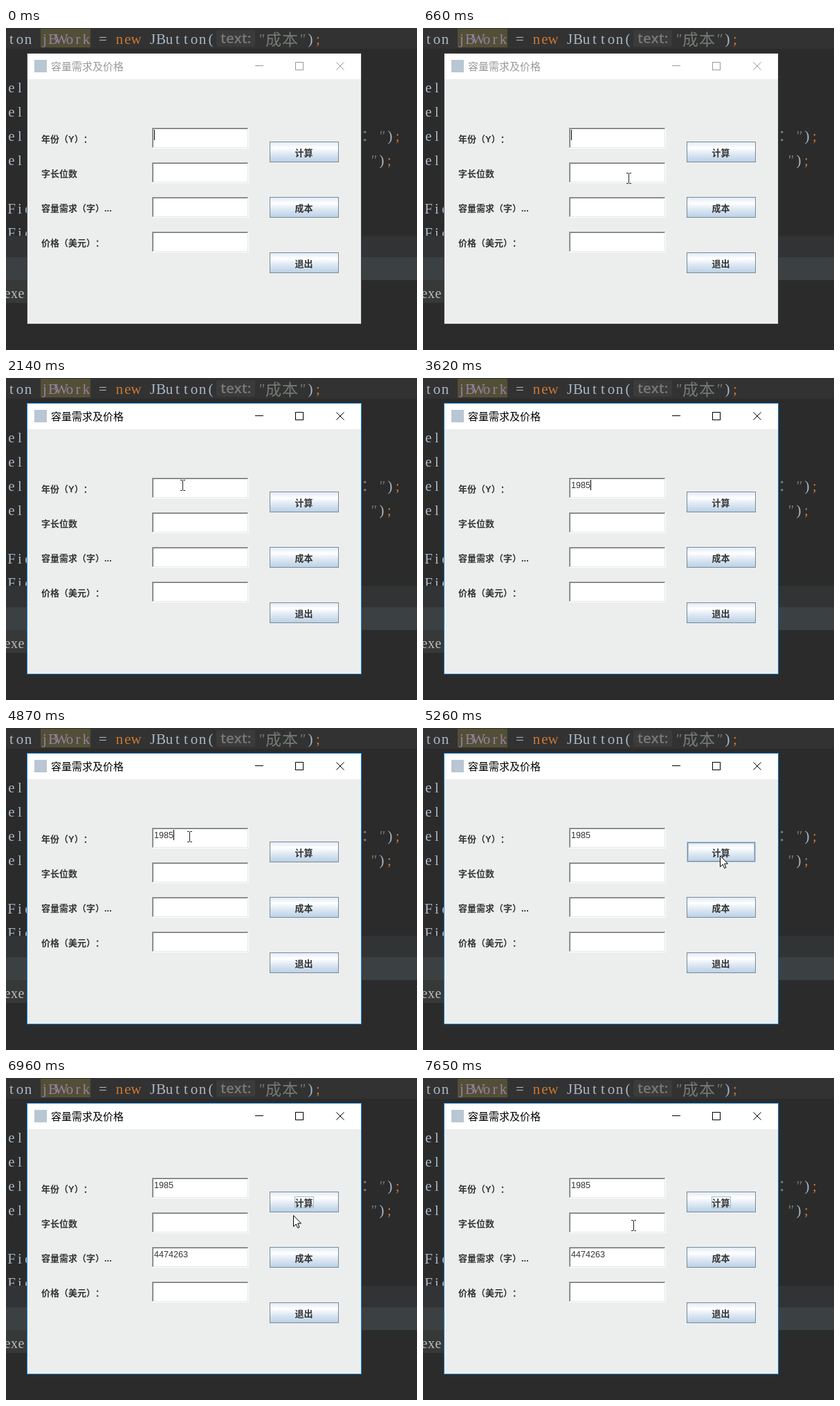
These frames come from a looping animation (594 by 465 pixels, 8000 ms). An HTML page:

```html
<!DOCTYPE html>
<html lang="zh-CN">
<head>
<meta charset="utf-8">
<style>
  html, body { margin: 0; width: 100%; height: 100%; overflow: hidden; background: #2b2b2b; }
  svg { display: block; width: 594px; height: 465px; }
  text { white-space: pre; text-spacing-trim: space-all; }
  .code { font: 21px 'Liberation Serif', serif; text-anchor: middle; }
  .quote { font: italic 21px 'Liberation Serif', serif; text-anchor: middle; }
  .han { font: 300 23px 'Noto Sans CJK SC', 'Noto Sans CJK', sans-serif; letter-spacing: 1px; }
  .hint { font: 600 20.5px 'Open Sans', sans-serif; }
  .title { font: 15px 'Noto Sans CJK SC', 'Noto Sans CJK', sans-serif; }
  .label { font: bold 13px 'Liberation Sans', 'Noto Sans CJK SC', 'Noto Sans CJK', sans-serif; }
  .value { font: 12.6px 'Liberation Sans', sans-serif; }
</style>
</head>
<body>
<svg viewBox="0 0 594 465">
  <defs>
    <linearGradient id="face" x2="0" y2="1">
      <stop stop-color="#dde8f3"/>
      <stop offset=".3" stop-color="#fff"/>
      <stop offset=".6" stop-color="#dde8f3"/>
      <stop offset="1" stop-color="#b8cfe5"/>
    </linearGradient>
  </defs>
  <g id="editor"></g>
  <g id="dialog"></g>
</svg>
<script>
const LOOP = 8000;
const PLAIN = '#a9b7c6', ORANGE = '#cc7832', STRING = '#747b75', FIELD = '#9580a0';
const SHADOW = '#7a8a99', BLUE = '#b8cfe5';

const rect = (x, y, w, h, fill, more = '') =>
  `<rect x="${x}" y="${y}" width="${w}" height="${h}" fill="${fill}" ${more}/>`;
const outline = (x, y, w, h, color) =>
  rect(x + .5, y + .5, w - 1, h - 1, 'none', `stroke="${color}"`);
const text = (cls, x, y, s, fill = '#333', more = '') =>
  `<text class="${cls}" x="${x}" y="${y}" fill="${fill}" ${more}>${s}</text>`;
// Each letter is centred in its own cell
const code = (x, y, s, fill = PLAIN, cell = 12, more = '') =>
  text('code', [...s].map((_, i) => x + cell * (i + .5)).join(' '), y, s, fill, more);
const quote = (x, y) => text('quote', x + 6, y, '"', STRING);
const within = (p, x, y, w, h) => p.x >= x && p.x < x + w && p.y >= y && p.y < y + h;

const ROWS = [144, 194, 244, 294];
const LABELS = ['年份（Y）：', '字长位数', '容量需求（字）...', '价格（美元）：'];
const BUTTONS = [['计算', 164], ['成本', 244], ['退出', 324]];

function editor() {
  const closing = (x, y) => quote(x, y) + code(x + 12, y, ')') + code(x + 23, y, ';', ORANGE);
  return rect(0, 0, 594, 30, '#323232') + rect(50, 1, 72, 27, '#524f36') +
    code(2, 23, 'ton') + code(50, 23, 'jBWork', FIELD) + code(134, 23, '=') +
    code(158, 23, 'new', ORANGE) + code(206, 23, 'JButton(') +
    rect(304, 3, 56, 24, '#3b3b3b', 'rx="3"') + text('hint', 310, 22, 'text:', '#787878') +
    quote(363, 23) + text('han', 375, 24.5, '成本', STRING) + closing(422, 23) +
    [93, 128, 163, 198].map(y => code(2, y, 'el')).join('') +
    [268, 303].map(y => code(2, y, 'Fie')).join('') +
    text('han', 513, 163, '：', STRING) + closing(537, 163) + closing(525, 198) +
    rect(0, 300, 594, 31, '#313335') + rect(0, 331, 594, 33, '#3b4042') +
    rect(0, 364, 31, 33, '#373838') +
    code(-3, 390, 'exe', '#bbb', 10, 'style="font-size:20px"');
}

function frame(active) {
  const ink = active ? '#000' : '#999';
  return rect(31, 37, 482, 37, '#fff') + rect(31, 74, 482, 353, '#eceeed') +
    outline(30, 36, 484, 392, active ? '#1883d7' : '#444') +
    rect(41, 46, 18, 18, '#b9c6d3') + text('title', 65, 61, '容量需求及价格', ink) +
    rect(360, 54, 12, 1, ink) + outline(418, 49, 12, 12, ink) +
    `<path d="M477.5 49.5l11 11m0-11l-11 11" stroke="${ink}"/>`;
}

function field(y, value) {
  return rect(211, y, 140, 30, '#fff') +
    rect(211, y, 139, 1, '#a6a6a6') + rect(211, y, 1, 29, '#a6a6a6') +
    rect(212, y + 1, 137, 1, '#747474') + rect(212, y + 1, 1, 27, '#747474') +
    rect(212, y + 28, 138, 1, '#e4e6e5') + rect(349, y + 1, 1, 28, '#e4e6e5') +
    text('value', 214, y + 15, value);
}

function button(label, y, { pressed, hover, focus }) {
  let s = rect(381, y, 100, 30, pressed ? BLUE : 'url(#face)');
  if (hover && !pressed) {
    s += outline(381, y, 100, 30, BLUE) + outline(382, y + 1, 98, 28, SHADOW) +
      outline(383, y + 2, 96, 26, BLUE);
  } else {
    s += outline(381, y, 100, 30, SHADOW);
    if (pressed) s += rect(381, y + 1, 100, 1, SHADOW) + rect(382, y, 1, 30, SHADOW);
  }
  if (focus) s += outline(417, y + 7, 28, 17, '#a3b8cc');
  return s + text('label', 430.5, y + 21, label, '#333', 'text-anchor="middle"');
}

// Pointer moves: start, end, number of pictures, easing, curve points
const out = k => 1 - (1 - k) ** 2;
const smooth = k => k * k * (3 - 2 * k);
const MOVES = [
  [350, 890, 8, out, [464, 426], [370, 330], [253, 154]],
  [4720, 5260, 8, smooth, [253, 154], [341, 169], [429, 184]],
  [5640, 5720, 2, k => (1 + k) / 2, [429, 184], [435.5, 184], [442, 184]],
  [6960, 7650, 10, out, [415, 198], [365, 234], [302, 212]],
];

function pointer(t) {
  if (t < 350 || (t >= 2765 && t < 4720)) return null;
  const [start, end, n, ease, a, b, c] = MOVES.filter(m => t >= m[0]).pop();
  const k = Math.min(1, Math.floor((t - start) / (end - start) * (n - 1) + .01) / (n - 1));
  const e = ease(k);
  const at = i => Math.round((1 - e) ** 2 * a[i] + 2 * e * (1 - e) * b[i] + e * e * c[i]);
  return { x: at(0), y: at(1) };
}

function cursor(p) {
  const beam = ROWS.some(y => within(p, 211, y, 140, 30));
  const shape = beam
    ? '<path d="M-1 -6.5h2.5l1 1 1-1H6M2.5 -6V8M-1 8.5h2.5l1-1 1 1H6" fill="none" stroke="#222"/>'
    : '<path d="M.5 .5V16.5L4.2 13 6.7 18.5 9 17.5 6.6 12H11.5Z" fill="#fff" stroke="#000"/>';
  return `<g transform="translate(${p.x} ${p.y})">${shape}</g>`;
}

const KEYS = [2840, 3010, 3390, 3620];
const BLINKS = [2140, 2690, 4170, 4720, 5260, 5720, 6270];

function dialog(t) {
  const p = pointer(t);
  const typed = KEYS.filter(k => t >= k).length;
  const caret = BLINKS.filter(b => t >= b).length % 2 === 0 && t < 6270;
  const pressed = t >= 6270 && t < 6350;
  const click = pressed || (t >= 1440 && t < 1590);
  const values = ['1985'.slice(0, typed), '', t >= 6350 ? '4474263' : '', ''];

  let s = frame(t >= 1590);
  ROWS.forEach((y, i) => s += text('label', 51, y + 21, LABELS[i]) + field(y, values[i]));
  BUTTONS.forEach(([label, y], i) => s += button(label, y, {
    pressed: pressed && i === 0,
    focus: t >= 6270 && i === 0,
    hover: p && within(p, 381, y, 100, 30),
  }));
  if (caret) s += rect(214 + 7 * typed, 147, 1, 15, '#000');
  if (click) s += `<circle cx="${p.x}" cy="${p.y}" r="15" fill="#ff0" fill-opacity=".5"/>`;
  return p ? s + cursor(p) : s;
}

const layer = document.getElementById('dialog');
document.getElementById('editor').innerHTML = editor();
let shown = '';
const begin = performance.now();

function draw() {
  const next = dialog((performance.now() - begin) % LOOP);
  if (next !== shown) layer.innerHTML = shown = next;
  requestAnimationFrame(draw);
}
draw();
</script>
</body>
</html>
```
